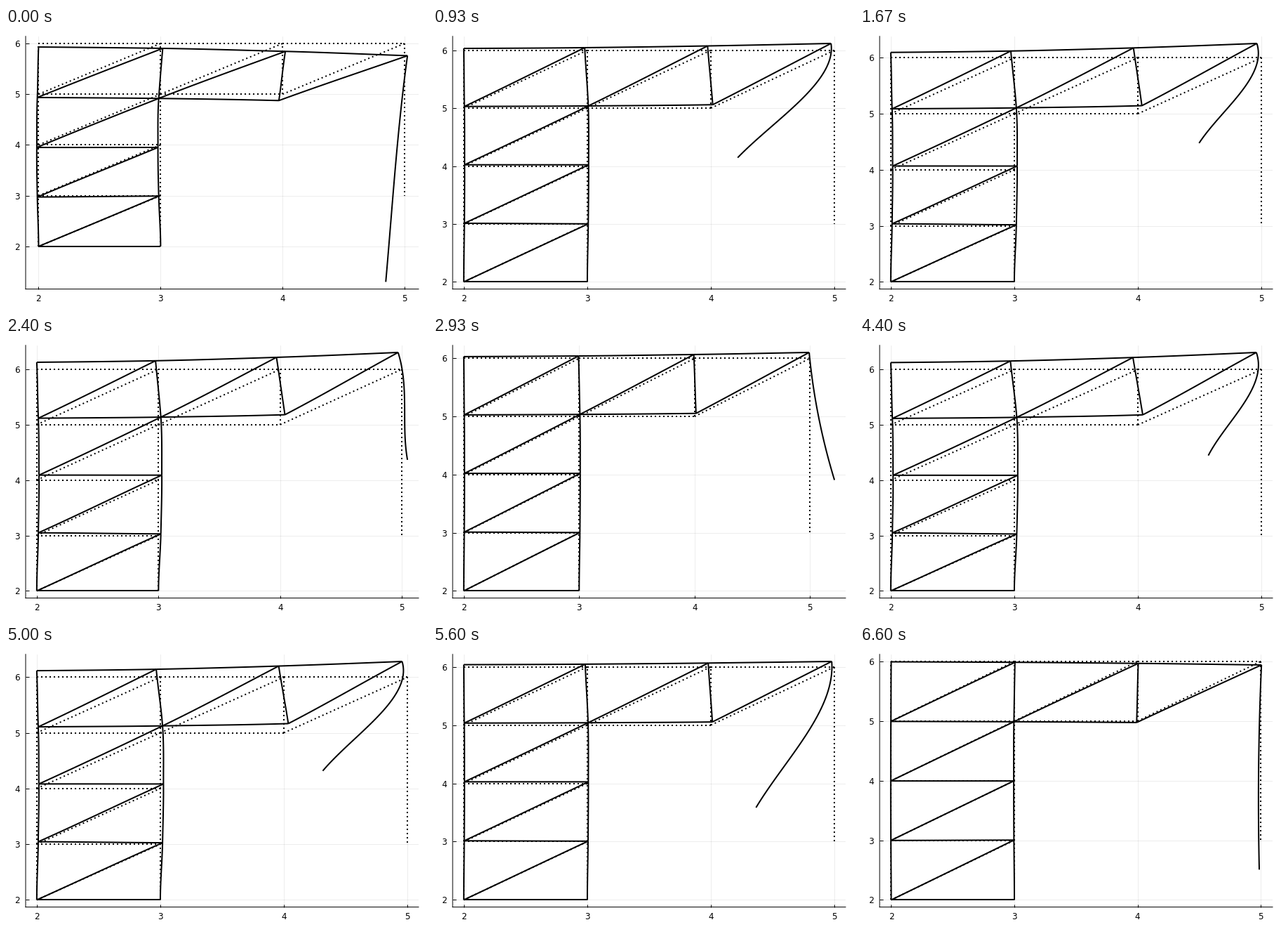
A matplotlib script that plays this animation: 600x400 px, repeating every 6.67 s.

```python
import numpy as np
import matplotlib.pyplot as plt
from matplotlib.animation import FuncAnimation
from matplotlib.ticker import MultipleLocator

plt.rcParams["font.family"] = "DejaVu Sans"

STEPS, LOOP_MS = 100, 6670  # the picture changes once per step
TICKS = 230  # finer clock, so that no change comes late
PX = 72 / 100  # one pixel in points
TIP, HOOK = (5, 6), (5, 3)

FRAME = (
    [((2, y), (3, y)) for y in range(2, 7)]
    + [((x, y), (x, y + 1)) for x in (2, 3) for y in range(2, 6)]
    + [((2, y), (3, y + 1)) for y in range(2, 6)]
    + [((3, 5), (4, 5)), ((3, 6), (4, 6)), ((4, 6), (5, 6))]
    + [((4, 5), (4, 6)), ((3, 5), (4, 6)), ((4, 5), (5, 6))]
)
MEMBERS = FRAME + [(TIP, HOOK)]
NODES = sorted({n for m in FRAME for n in m})


def wave(t, freq, peak=0):
    return np.cos(2 * np.pi * freq * (t - peak))


def motion(t):
    """Offsets of hook, boom tip, tower top and sideways sway at step t."""
    slow = -wave(t, 0.099)
    fast = wave(t, 0.2025, 36)
    hook = (1.5 + 0.18 * np.exp(-t / 10)) * slow - 0.02
    tip = 0.012 + 0.235 * slow + 0.075 * fast
    top = 0.015 + 0.075 * slow + 0.042 * fast
    ripple = 0.14 * np.exp(-t / 40) * wave(t, 1 / 36)
    sway = -0.23 - 0.45 * wave(t, 1 / 64, 14) + ripple
    return hook, tip, top, sway


def shift(node, tip, top, sway):
    """The tower stretches and bows, the boom tilts with its tip."""
    x, h = node[0] - 2, node[1] - 2
    bow = 0.06 * tip * np.sin(np.pi * h / 4) * (1 + x * x / 2)
    pull = 0.11 * (tip - 0.18 * sway) * np.tanh(x) * (h == 4)
    tilt = -(tip - top) * (x / 3) ** 1.7 * np.cos(np.pi * h / 4) * (h > 0)
    return np.array([bow - pull, top * np.sin(np.pi * h / 8) + tilt])


def pose(t):
    """Displacement and rotation of every node."""
    hook, tip, top, sway = motion(t)
    disp = {n: shift(n, tip, top, sway) for n in NODES}

    # A joint turns by the mean turn of the members it holds
    turns = {n: [] for n in NODES}
    for p, q in FRAME:
        (dx, dy), (du, dv) = np.subtract(q, p), disp[q] - disp[p]
        turn = (dx * dv - dy * du) / (dx * dx + dy * dy)
        turns[p].append(turn)
        turns[q].append(turn)
    rot = {n: np.mean(v) if n[1] > 2 else 0 for n, v in turns.items()}

    disp[HOOK] = np.array([disp[TIP][0] + sway, hook])
    rot[HOOK] = 0.42 * sway + 0.02
    return disp, rot


S = np.linspace(0, 1, 41)[:, None]


def hermite(s, a, b, ma, mb):
    """Cubic from a to b with end slopes ma, mb for s in 0..1."""
    return (a * (1 + 2 * s) * (1 - s) ** 2 + b * s * s * (3 - 2 * s)
            + ma * s * (1 - s) ** 2 + mb * s * s * (s - 1))


def bent(p, q, disp, rot):
    """Beam axis: linear stretch along it, cubic bending across it."""
    axis = np.subtract(q, p).astype(float)
    length = np.hypot(*axis)
    e = axis / length
    n = np.array([-e[1], e[0]])
    along = (1 - S) * (disp[p] @ e) + S * (disp[q] @ e)
    across = hermite(S, disp[p] @ n, disp[q] @ n, rot[p] * length, rot[q] * length)
    return np.array(p) + S * axis + along * e + across * n


fig = plt.figure(figsize=(6, 4), dpi=100, facecolor="white")
ax = fig.add_axes([28 / 600, 1 - 371.6 / 400, 560 / 600, 359.8 / 400])
ax.spines[["top", "right"]].set_visible(False)
for side in ("left", "bottom"):
    ax.spines[side].set(linewidth=PX, snap=False)
for axis, pad in ((ax.xaxis, 7.1), (ax.yaxis, 8.5)):
    axis.set_major_locator(MultipleLocator(1))
    axis.set_major_formatter("{x:.0f}")
    axis.set_tick_params(direction="in", length=4.5 * PX, width=PX,
                         labelsize=12 * PX, pad=pad * PX)
ax.grid(color="black", alpha=0.1, linewidth=0.5)
ax.set_axisbelow(True)

for p, q in MEMBERS:
    ax.plot(*zip(p, q), color="black", lw=2 * PX, dashes=(1, 2))
beams = [ax.plot([], [], color="black", lw=2 * PX, solid_capstyle="butt")[0]
         for _ in MEMBERS]
REST = np.array([n for m in MEMBERS for n in m], float)


def limits(v):
    lo, hi = v.min(), v.max()
    pad = 0.03 * (hi - lo)
    return lo - pad, hi + pad


def draw(i):
    step = min((i + 1) * STEPS // TICKS, STEPS - 1)
    disp, rot = pose(step)
    curves = [bent(p, q, disp, rot) for p, q in MEMBERS]
    for line, c in zip(beams, curves):
        line.set_data(c[:, 0], c[:, 1])
    pts = np.vstack([REST, *curves])
    ax.set_xlim(limits(pts[:, 0]))
    ax.set_ylim(limits(pts[:, 1]))
    return beams


anim = FuncAnimation(fig, draw, frames=TICKS, interval=LOOP_MS / TICKS,
                     repeat=True, repeat_delay=0, blit=False)
plt.show()
```
